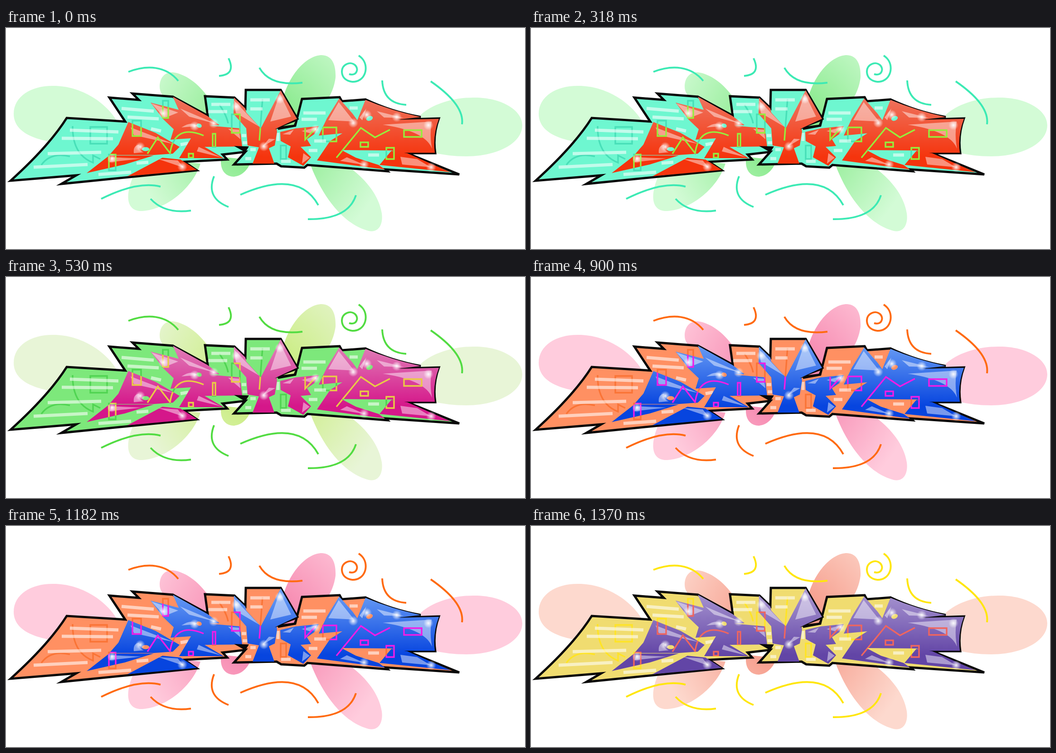
Write an HTML page that moves like this. It is 1145 px wide and 489 px high and loops after 1.64 s.

```html
<!DOCTYPE html>
<html lang="en">
<head>
<meta charset="utf-8">
<title>Colour-cycling lettering</title>
<style>
  html, body { margin: 0; width: 100%; height: 100%; overflow: hidden; background: #fff; }
  svg { display: block; width: 1145px; height: 489px; }
  .outline { fill: var(--light); stroke: #090909; stroke-width: 5; stroke-miterlimit: 6; }
  .swirls { fill: none; stroke: var(--swirl); stroke-width: 4; }
  .details { fill: none; stroke-width: 3.4; }
  .stripes { fill: none; stroke: #fff; stroke-width: 7; opacity: .58; }
  .shine { fill: #fff; opacity: .46; }
  .light { fill: var(--light); }
</style>
</head>
<body>
<svg id="art" viewBox="0 0 1145 489">
  <defs>
    <radialGradient id="petalFill" gradientUnits="userSpaceOnUse" cx="565" cy="230" r="285">
      <stop offset=".15" style="stop-color:var(--petalCore)"/>
      <stop offset="1" style="stop-color:var(--petal)"/>
    </radialGradient>
    <linearGradient id="bodyFill" gradientUnits="userSpaceOnUse" x1="0" y1="145" x2="0" y2="285">
      <stop offset="0" style="stop-color:var(--bodyTop)"/>
      <stop offset="1" style="stop-color:var(--body)"/>
    </linearGradient>
    <radialGradient id="glow">
      <stop offset="0" stop-color="#fff" stop-opacity=".95"/>
      <stop offset=".35" stop-color="#fff" stop-opacity=".6"/>
      <stop offset="1" stop-color="#fff" stop-opacity="0"/>
    </radialGradient>
    <path id="body" d="
      M270,208 L330,232 383,263 368,278 326,281 228,281 248,258Z
      M228,282 L326,282 262,302 178,321Z
      M345,287 L385,291 421,314 268,328Z
      M319,165 L381,181 368,152 445,195 471,215 448,216 516,222 521,262 438,263 480,288 382,288 408,244 363,247 370,224 347,202Z
      M503,154 L528,178 530,187 562,222 606,138 642,201 597,222 598,230 593,260 580,266 592,300 544,300 558,264 533,260 530,222 502,190Z
      M605,230 L640,222 690,217 680,235 664,246 673,261 650,263 673,286 656,305 622,286 628,262 606,250Z
      M735,156 L765,190 775,204 793,159 Q850,183 915,197 L862,203 955,201 Q941,238 946,276 L870,276 850,271 740,270 772,287 822,303 836,313 686,293 715,250 742,233 690,238 708,200Z
      M850,272 L885,277 980,319 824,303Z"/>
    <clipPath id="inBody"><use href="#body"/></clipPath>
    <path id="marks" d="
      M279,205h19v34h-19Z M346,161h12v38h-12Z M227,280h15v35h-15Z M498,191h18v41h-18Z
      M456,234h6v29h-6Z M403,278h10v9h-10Z M606,260h12v30h-12Z M699,220h30v31h-30Z
      M782,253h17v10h-17Z M839,265h17v25h-17Z M878,226h39v15h-39Z M186,219h37v37h-37Z
      M312,278 L335,242 362,277 Q372,211 436,238 M729,287 L783,221 814,242 847,225
      M660,221 V247 L683,222 M566,157 L559,249 M471,170 Q487,194 490,211
      M147,217 Q146,280 192,298 V282 L208,290 M78,303 Q98,274 141,284"/>
  </defs>

  <path fill="url(#petalFill)" d="
    M17,190 C17,150 58,127 105,128 C165,128 225,165 250,215 L130,255 C75,252 17,235 17,190Z
    M339,130 C339,108 352,97 368,98 C400,102 432,130 450,160 L445,200 365,165 Q339,150 339,130Z
    M610,160 C625,100 665,60 697,60 C722,61 728,85 727,110 Q723,140 705,165 L640,232 600,228Z
    M915,192 C945,165 995,153 1035,154 C1090,154 1139,180 1139,215 C1139,257 1080,284 1015,284 Q975,284 940,275Z
    M282,325 C264,365 263,402 295,405 C345,406 410,360 429,300 L340,290Z
    M475,285 C470,315 485,329 503,329 C522,327 535,312 542,292Z
    M670,298 C690,355 735,432 800,449 C825,454 832,430 829,410 C822,365 785,325 745,300Z"/>

  <path class="swirls" d="
    M270,97 C312,81 353,84 380,117 M491,67 Q508,103 470,106 M559,88 Q583,130 654,121
    M778,61 C800,75 797,105 780,115 C765,124 742,117 741,97 C741,80 760,73 770,82 C780,92 772,107 757,102
    M830,116 Q832,167 883,170 M937,118 Q1012,170 1006,213 M210,378 Q290,338 341,351
    M319,378 Q350,412 408,404 M459,328 Q440,376 491,396 M517,369 Q645,312 689,392
    M666,423 Q755,424 772,370"/>

  <path class="outline" d="
    M10,338 Q95,261 134,199 L263,207 228,154 293,159 279,145 368,152 445,194 439,151 504,154 528,177
    529,137 606,137 643,201 600,223 638,216 653,157 736,153 741,162 793,158 Q850,185 915,197 L862,203
    955,200 Q941,238 947,277 L885,277 1000,324 838,313 842,317 665,303 658,309 607,306 597,300 503,302
    528,274 478,280 488,291 393,296 421,315 122,345 155,326Z"/>
  <use href="#marks" class="details" style="stroke:var(--deep)"/>
  <path class="stripes" d="
    M141,226 L248,230 M123,244 L236,245 M92,278 L210,275 M61,308 L180,302
    M255,178 L326,184 M268,197 L337,201 M320,223 L342,228 M204,324 L276,319 M288,299 L314,297
    M453,169 H495 M446,185 H488 M539,159 H582 M539,179 H566 M656,188 H705 M652,202 H686
    M758,177 H776 M799,281 H823 M539,269 H551 M528,289 H541 M607,295 H628 M668,271 H687
    M385,258 L402,255 M680,250 H706 M520,238 H530 M522,254 H532 M600,232 V250"/>
  <use href="#body" fill="url(#bodyFill)"/>
  <path fill="#090909" d="M503,261 L536,262 528,275Z M593,224 L640,202 636,216Z"/>
  <path fill="url(#petalFill)" d="M611,217 L638,207 635,214Z"/>
  <path class="shine" d="
    M275,220 L371,257 282,237Z M282,277 Q280,260 294,258 Q290,270 304,275Z
    M232,286 L299,289 228,297Z M336,290 L379,293 392,309Z
    M384,178 L466,213 404,196Z M321,167 L380,187 350,199Z M387,220 Q410,205 422,217Z
    M425,263 L474,286 421,273Z M503,160 L558,218 507,188Z M490,223 L514,225 517,246Z
    M604,145 L629,196 583,207Z M565,263 L580,245 594,246Z M610,235 L635,225 627,236Z
    M652,228 L688,219 672,233Z M656,277 L670,287 653,300Z
    M734,164 L768,207 711,204Z M795,178 L786,204 780,198Z M818,184 L878,199 834,198Z
    M831,214 L939,207 Q934,239 940,267 Q925,228 831,214Z
    M870,285 L907,290 937,308 874,302Z M752,286 L791,303 737,294Z"/>
  <use href="#marks" class="details" clip-path="url(#inBody)" style="stroke:var(--line)"/>
  <g class="light">
    <ellipse cx="308" cy="268" rx="8" ry="4.5"/>
    <ellipse cx="426" cy="216" rx="6" ry="4.5" transform="rotate(20 426 216)"/>
    <ellipse cx="802" cy="200" rx="7.5" ry="5" transform="rotate(-22 802 200)"/>
  </g>
  <g id="sparkles" fill="url(#glow)"></g>
</svg>
<script>
  const art = document.getElementById('art');
  const names = ['light', 'deep', 'bodyTop', 'body', 'petal', 'petalCore', 'swirl', 'line'];
  const schemes = [
    { until: 530, colors: '#6ef7d0 #48dfb8 #ee7864 #f5340d #d3fbd6 #80e884 #3ceab4 #96ee3c' },
    { until: 900, colors: '#7de87b #50d452 #e184ba #d5178a #e8f5d7 #c7ec78 #52dc42 #e9cb45' },
    { until: 1370, colors: '#ff9062 #fa7436 #6c9ff5 #0745df #ffccdd #f580aa #ff6a10 #f21ce6' },
    { until: 1640, colors: '#f0dc70 #ffe425 #a896d1 #6245a6 #fdd9ce #f59482 #ffe60c #ef655f' }
  ];
  const sparkles = [[296, 263], [234, 289], [389, 307], [347, 189], [416, 217], [458, 211],
    [508, 174], [604, 157], [569, 262], [683, 224], [766, 210], [796, 192], [862, 197],
    [932, 215], [790, 302], [938, 308]];

  document.getElementById('sparkles').innerHTML =
    sparkles.map(([x, y]) => `<circle cx="${x}" cy="${y}" r="11"/>`).join('');

  const start = performance.now();
  let current;
  function draw() {
    const time = (performance.now() - start) % 1640;
    const scheme = schemes.find(s => time < s.until);
    if (scheme !== current) {
      current = scheme;
      scheme.colors.split(' ').forEach((color, i) => art.style.setProperty('--' + names[i], color));
    }
    requestAnimationFrame(draw);
  }
  draw();
</script>
</body>
</html>
```
